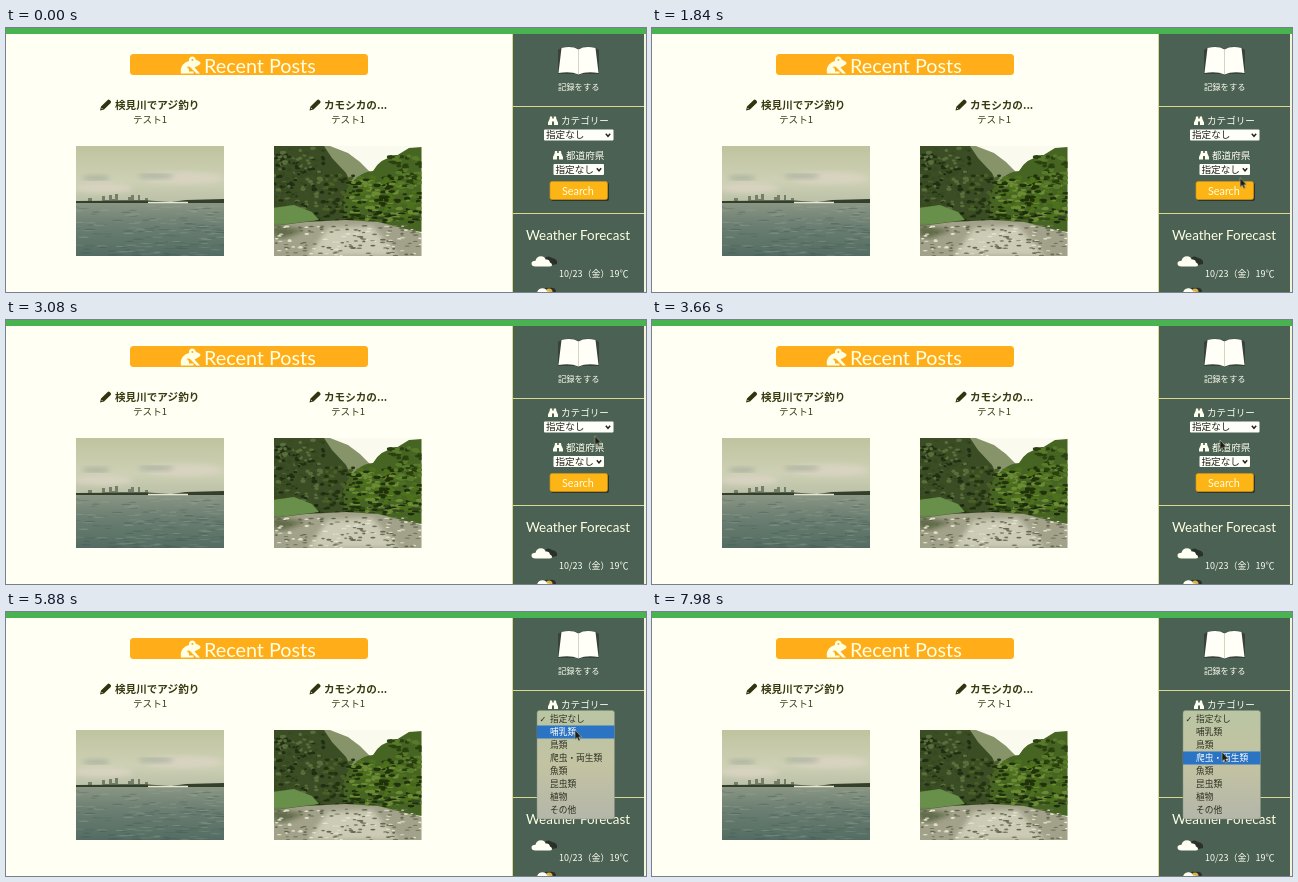
An HTML page for the animation above (8 s loop, 640 by 264 pixels).

```html
<!DOCTYPE html>
<html lang="ja">
<head>
<meta charset="utf-8">
<title>Recent Posts</title>
<style>
html, body { margin: 0; width: 100%; height: 100%; overflow: hidden; background: #fffff4; }
svg { display: block; width: 100%; height: 100%; }
text { font: 9.6px "Noto Sans CJK JP", "Noto Sans CJK", "Noto Sans", sans-serif; fill: #3a3a12; }
.head { font-size: 10.6px; font-weight: 700; }
.side text { fill: #fffff0; }
.side .dark { fill: #222218; }
.side .small { font-size: 8.3px; }
.side .day { font-size: 9px; }
.side .label { font-weight: 500; }
text.hand { font-family: Lato, sans-serif; fill: #ffffe4; }
.menu text { font-size: 8.7px; font-weight: 500; fill: #2e3022; }
</style>
</head>
<body>
<svg viewBox="0 0 640 264">
  <defs>
    <linearGradient id="sky" x2="0" y2="1">
      <stop stop-color="#bfc49f"/><stop offset=".6" stop-color="#cdd0b4"/><stop offset="1" stop-color="#b9c0a6"/>
    </linearGradient>
    <linearGradient id="sea" x2="0" y2="1">
      <stop stop-color="#8c9785"/><stop offset=".4" stop-color="#6d8073"/><stop offset="1" stop-color="#536c63"/>
    </linearGradient>
    <linearGradient id="glass" x2="0" y2="1">
      <stop stop-color="#b9c5a3"/><stop offset=".5" stop-color="#c3c3a2"/><stop offset="1" stop-color="#b4b6a9"/>
    </linearGradient>
    <filter id="soft"><feGaussianBlur stdDeviation="2.5"/></filter>
    <clipPath id="clipSea"><path d="M70 118h148v110H70z"/></clipPath>
    <clipPath id="clipRiver"><path d="M268 118h147.500v110H268z"/></clipPath>
    <path id="pencil" d="M0 11 1 7 7.700.4Q8.700-.4 9.700.5L10.700 1.500Q11.500 2.400 10.700 3.400L4 10ZM1.400 9.600 2.800 9.200 1.900 8.200Z" fill="#33330f" fill-rule="evenodd"/>
    <path id="glasses" d="M2 0H4.200V2H5.800V0H8L8.400 2.500 10 6V8.500H6V5H4V8.500H0V6L1.600 2.500Z" fill="#fffff0"/>
    <path id="chevron" d="M-2.200-1.300 0 1.300 2.200-1.300" fill="none" stroke="#222" stroke-width="1.400"/>
    <path id="cloud" d="M4 11Q0 11 0 8 0 5.300 4 5.300 5 .8 9.500.8 13 .8 14 4 18 3.500 18.500 7 21 8 20.500 10 20 11 18 11Z" fill="#fffff4"/>
  </defs>

  <path d="M0 0H640V6H0Z" fill="#48b350"/>

  <rect x="124" y="26" width="238" height="21" rx="3.500" fill="#ffae1a"/>
  <path d="M175 45.500Q174 40 177 36.500 179.500 33.500 183 33 182.500 29 186 28.500 189 28.500 189.700 31.500L193.500 33.500Q195.500 35 193.500 36.700L188.500 39.500 194 45.500H190.500L185.500 40.500Q183.500 37.500 180.500 39 183.500 40 183 43.500H187.500V45.500Z" fill="#ffffe4"/>
  <circle cx="186.400" cy="32" r="1" fill="#ffae1a"/>
  <text class="hand" x="198" y="44.500" style="font-size:19.800px">Recent Posts</text>

  <use href="#pencil" x="94" y="71.500"/>
  <text class="head" x="109" y="80.500">検見川でアジ釣り</text>
  <text x="127" y="95">テスト1</text>
  <use href="#pencil" x="303.500" y="71.500"/>
  <text class="head" x="318" y="80.500">カモシカの...</text>
  <text x="325" y="95">テスト1</text>

  <g clip-path="url(#clipSea)">
    <path d="M70 118h148v58H70z" fill="url(#sky)"/>
    <g fill="#d8d3c0" filter="url(#soft)">
      <ellipse cx="178" cy="150" rx="38" ry="6"/><ellipse cx="97" cy="160" rx="30" ry="5"/>
    </g>
    <g fill="#a3ab9b" filter="url(#soft)">
      <ellipse cx="90" cy="150" rx="14" ry="2"/><ellipse cx="150" cy="148" rx="18" ry="2"/>
    </g>
    <path d="M70 174h148v54H70z" fill="url(#sea)"/>
    <path d="M82 174V170H86V173H96V168H99V172H103V167H106V171H109V166H112V172H122V169H125V167H128V172H132V167H134V172H139V170H142V174Z" fill="#747e69"/>
    <path d="M70 175V173L142 172.500 165 174 180 172 218 171V175Z" fill="#343f2b"/>
    <path d="M142 174.500H182" stroke="#e6e7d0" stroke-width="1.500"/>
    <g id="waves" opacity=".3"/>
  </g>

  <g clip-path="url(#clipRiver)">
    <path d="M267 118h149v110H267z" fill="#fafaee"/>
    <path d="M267 118H324L342 125 354 134 364 144 376 150V203H267Z" fill="#87946a"/>
    <path d="M267 118H318L326 130 340 145 350 166V200H267Z" fill="#3b4d24"/>
    <path d="M338 166Q350 144 367 143 374 130 390 128L403 120 416 119V204L338 194Z" fill="#476522"/>
    <g id="leaves"/>
    <path d="M267 180 288 177 306 184 313 192 267 198Z" fill="#68904a"/>
    <path d="M267 198 300 194 340 192 372 194 416 205V228H267Z" fill="#a2a189"/>
    <path d="M322 200 366 198 393 228H302Z" fill="#cccbb5" filter="url(#soft)"/>
    <path d="M267 197 300 202 278 210 267 209Z" fill="#606c48" filter="url(#soft)"/>
    <g id="stones"/>
  </g>

  <g class="side">
    <path d="M507 6H638V264H507Z" fill="#4a6153"/>
    <path d="M506.500 6V264M507 78.500H638M507 185.500H638" stroke="#d9d88f"/>
    <path d="M638 6H640V264H638Z" fill="#f4f4dc"/>

    <path d="M552 22 555 20Q566 17 572.500 21 579 17 590 20L593 22V46H575L572.500 47.500 570 46H552Z" fill="#39423a"/>
    <path d="M552.500 45 555.500 20Q566 17.500 572.500 21.500 579 17.500 589.500 20L592.500 45Q580 43 572.500 46.500 565 43 552.500 45Z" fill="#fffff8"/>
    <path d="M572.500 22V46" stroke="#d4d5c2"/>
    <text class="small" x="552" y="61.500">記録をする</text>

    <use href="#glasses" x="542" y="88.500"/>
    <text class="label" x="555" y="96">カテゴリー</text>
    <rect x="538" y="101.500" width="69.500" height="11" rx="1" fill="#fffffa"/>
    <text class="dark" x="540" y="110.300">指定なし</text>
    <use href="#chevron" x="602" y="107"/>

    <use href="#glasses" x="547" y="123"/>
    <text class="label" x="560" y="131">都道府県</text>
    <rect x="547.500" y="136" width="50.500" height="11" rx="1" fill="#fffffa"/>
    <text class="dark" x="549.500" y="144.800">指定なし</text>
    <use href="#chevron" x="593" y="141.500"/>

    <rect x="545" y="154.500" width="58" height="18.500" rx="2" fill="#2d352c"/>
    <rect x="544" y="153.500" width="57.500" height="18" rx="2" fill="#fdb515" stroke="#d0921b" stroke-width=".7"/>
    <text class="hand" x="556" y="166.500" style="font-size:10.800px">Search</text>

    <text class="hand" x="520" y="211.500" style="font-size:13.400px">Weather Forecast</text>
    <path d="M539 230Q542 227 546 230 552 231 551 236L546 237Z" fill="#2a302a"/>
    <use href="#cloud" x="525.500" y="227.500"/>
    <text class="day" x="553" y="249">10/23（金）19℃</text>
    <path d="M537 264Q538 259 543 260 550 259 550 264Z" fill="#2a302a"/>
    <circle cx="543" cy="264" r="3.500" fill="#d9b24a"/>
    <use href="#cloud" x="527" y="259.500"/>
  </g>

  <g class="menu" id="menu">
    <rect x="531" y="98.500" width="77.500" height="108.500" rx="2.500" fill="url(#glass)" stroke="#85917c" stroke-width=".5"/>
  </g>
  <g id="cursor">
    <path d="M0 0V9.500L2.200 7.600 3.600 11 5.200 10.300 3.800 7H6.500Z" fill="#1c1c14" stroke="#b9bda0" stroke-width=".6"/>
  </g>
</svg>
<script>
const LOOP = 8000, OPEN = 4200;
const $ = id => document.getElementById(id);

function add(parent, tag, attrs, text = "") {
  const el = document.createElementNS("http://www.w3.org/2000/svg", tag);
  for (const key in attrs) el.setAttribute(key, attrs[key]);
  el.textContent = text;
  parent.append(el);
  return el;
}

let seed = 11;
const random = () => (seed = seed * 16807 % 2147483647) / 2147483647;
const between = (a, b) => a + (b - a) * random();

function scatter(parent, count, [x0, y0, x1, y1], rx, ry, colors) {
  for (let i = 0; i < count; i++) {
    add(parent, "ellipse", {
      cx: between(x0, x1), cy: between(y0, y1),
      rx: between(rx / 2, rx), ry: between(ry / 2, ry),
      fill: colors[i % colors.length]
    });
  }
}
scatter($("waves"), 160, [70, 178, 218, 228], 7, .7, ["#344d46", "#a9b3a0"]);
scatter($("leaves"), 170, [267, 120, 318, 182], 3, 2, ["#1f2f14", "#5a6d3c", "#36491f"]);
scatter($("leaves"), 60, [318, 146, 348, 190], 3, 2, ["#22330f", "#4a6027"]);
scatter($("leaves"), 210, [345, 148, 416, 192], 4, 2, ["#203209", "#4d701d", "#6b8b35"]);
scatter($("leaves"), 60, [384, 128, 416, 160], 4, 2, ["#2a400f", "#587a2b"]);
scatter($("leaves"), 50, [310, 184, 416, 195], 4, 1.5, ["#1c2a0d", "#34491b"]);
scatter($("stones"), 150, [268, 197, 416, 228], 3, 1, ["#747460", "#e3e1cb", "#65694f"]);

function loop(el, steps, easing = "linear") {
  el.animate(steps.map(([ms, style]) => ({ offset: ms / LOOP, easing, ...style })),
    { duration: LOOP, iterations: Infinity });
}

// A style that holds only from start to end.
function during(el, start, end, name, off, on) {
  const steps = [[0, off], [start, on], [end, off], [LOOP, off]];
  loop(el, steps.map(([ms, value]) => [ms, { [name]: value }]), "step-end");
}

during($("menu"), OPEN, LOOP, "opacity", 0, 1);

const choices = ["指定なし", "哺乳類", "鳥類", "爬虫・両生類", "魚類", "昆虫類", "植物", "その他"];
const hoverStarts = [OPEN, 5350, 6500, 7150, LOOP];
choices.forEach((name, i) => {
  const y = 110 + 13 * i;
  const bar = add($("menu"), "rect", { x: 531, y: y - 9.5, width: 77.5, height: 13, fill: "#2b73c3", opacity: 0 });
  const parts = [add($("menu"), "text", { x: 544, y }, name)];
  if (!i) parts.push(add($("menu"), "text", { x: 533.5, y, style: "font-family:'DejaVu Sans',sans-serif;font-size:8px" }, "✓"));
  if (i > 3) return;
  const span = [hoverStarts[i], hoverStarts[i + 1]];
  during(bar, ...span, "opacity", 0, 1);
  parts.forEach(part => during(part, ...span, "fill", "#2e3022", "#ffffff"));
});

const path = [
  [0, 566, 270], [250, 566, 270], [800, 561, 175], [1250, 561, 175],
  [1800, 588, 150], [2400, 606, 112], [2750, 606, 112], [3450, 568, 120],
  [3800, 568, 120], [4150, 569, 108], [5100, 569, 108], [5500, 569, 118],
  [6100, 569, 118], [7300, 570, 140], [LOOP, 570, 140]
];
loop($("cursor"), path.map(([ms, x, y]) => [ms, { transform: `translate(${x}px, ${y}px)` }]), "ease-in-out");
</script>
</body>
</html>
```
